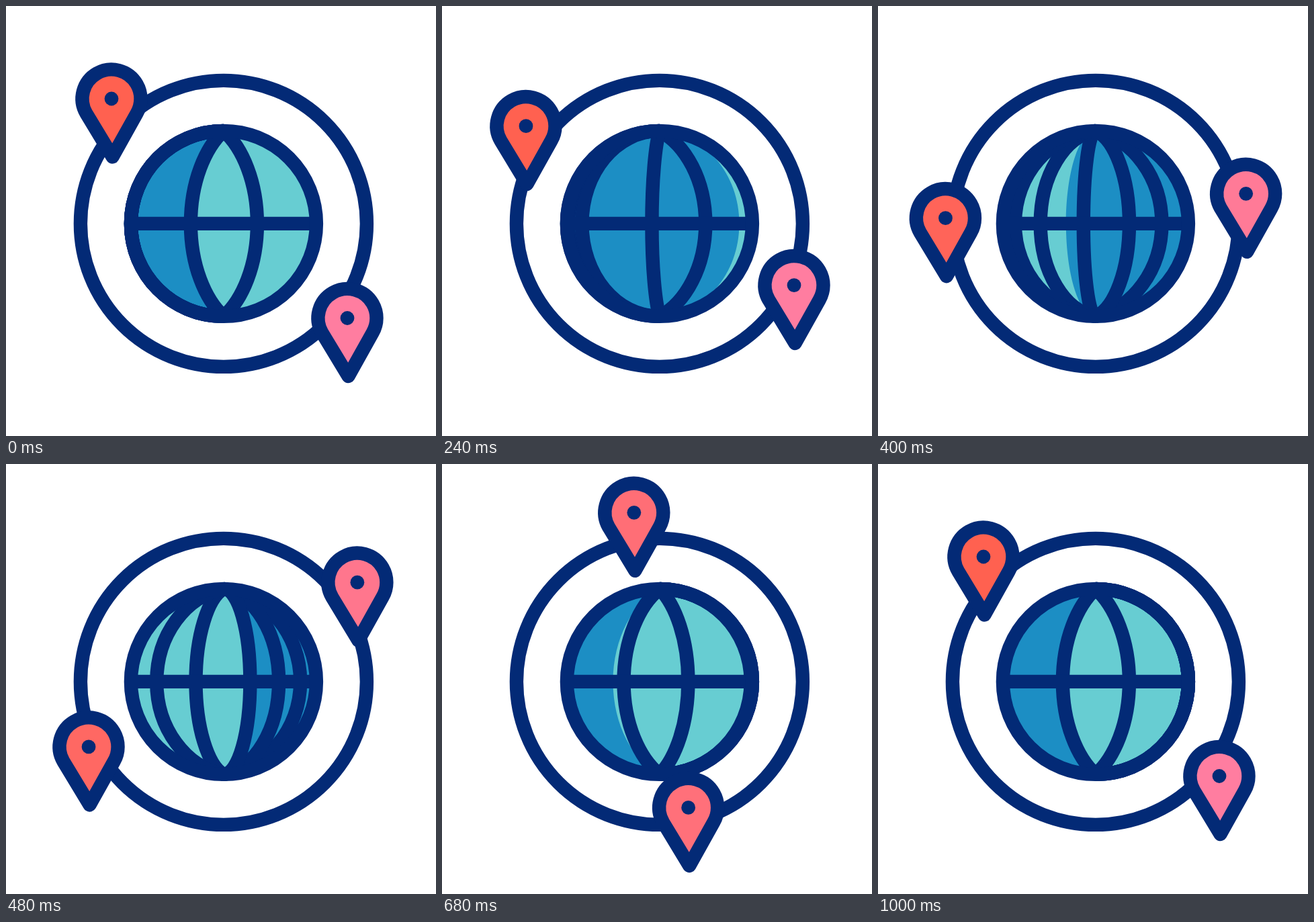
An HTML page with a canvas that plays this animation: 640x640 px, repeating every 2 s.

```html
<!DOCTYPE html>
<html lang="en">
<head>
<meta charset="utf-8">
<title>Globe with orbiting pins</title>
<style>
html, body { margin: 0; width: 100%; height: 100%; overflow: hidden; background: #fff; }
canvas { display: block; width: 640px; height: 640px; }
</style>
</head>
<body>
<canvas id="stage" width="640" height="640"></canvas>
<script>
const ctx = document.getElementById('stage').getContext('2d');
const LOOP = 2000, MOVE = 1000, STEP = 40;
const NAVY = '#032a76', LIGHT = '#67cdd2', DARK = '#1c8ec4';
const RED = [255, 97, 80], PINK = [255, 125, 160];
const CENTER = 323.9, ORBIT = 213, GLOBE = 138, PIN = 43.5;
const LEFT_REST = -49, RIGHT_REST = 50, PAST_EDGE = 145;
const REST_KINK = 25; // how far a resting meridian leans away from an ellipse
const RAD = Math.PI / 180;

const lerp = (a, b, s) => a + (b - a) * s;
const progress = (t, start, end) => Math.min(1, Math.max(0, (t - start) / (end - start)));
const smooth = s => s * s * (3 - 2 * s);

// Steep in-out easing for the trip along the orbit.
function orbitEase(s) {
  const done = s ** 2.06, left = 1.21 * (1 - s) ** 2.06;
  return done / (done + left);
}

// A curve that sweeps across the globe; only resting curves have a kink.
function sweep(from, to, start, end, color) {
  const kinkAt = x => Math.abs(x) < GLOBE ? REST_KINK : 0;
  return {
    color,
    at(t) {
      const s = smooth(progress(t, start, end));
      return {
        x: Math.min(GLOBE, lerp(from, to, s)),
        kink: lerp(kinkAt(from), kinkAt(to), s)
      };
    }
  };
}

const meridians = [
  sweep(RIGHT_REST, PAST_EDGE, 40, 750),
  sweep(LEFT_REST, PAST_EDGE, 40, 750),
  sweep(-GLOBE, GLOBE, 140, 710),
  sweep(-GLOBE, RIGHT_REST, 205, 745),
  sweep(-GLOBE, LEFT_REST, 260, 745)
];

// Each band fills the globe from its left side up to the sweeping curve.
const bands = [
  sweep(LEFT_REST, GLOBE, 0, 300, DARK),
  sweep(-GLOBE, GLOBE, 255, 625, LIGHT),
  sweep(-GLOBE, LEFT_REST, 480, 770, DARK)
];

function makePin(route, start, end) {
  const path = document.createElementNS('http://www.w3.org/2000/svg', 'path');
  path.setAttribute('d', route);
  return { path, length: path.getTotalLength(), start, end };
}

const pins = [
  makePin('M157 138C127 159 100 220 100 294S168 519 324 519C365 516 452 488 508 464.5'
    .replace('S168 519', 'C100 450 168 519'), RED, PINK),
  makePin('M508 464.5C518 440 548 340 548 294C548 153 465 69 324 69C250 69 182 108 157 138',
    PINK, RED)
];

function circle(x, y, r) {
  ctx.beginPath();
  ctx.arc(x, y, r, 0, 2 * Math.PI);
}

// Adds a pole-to-pole curve, from the bottom up.
function addMeridian({ x, kink }) {
  const poleX = 0.56 * x, poleY = GLOBE - kink, sideY = 76 - 0.56 * kink;
  ctx.bezierCurveTo(poleX, poleY, x, sideY, x, 0);
  ctx.bezierCurveTo(x, -sideY, poleX, -poleY, 0, -GLOBE);
}

function drawGlobe(t) {
  ctx.save();
  ctx.translate(CENTER, CENTER);
  circle(0, 0, GLOBE);
  ctx.fillStyle = LIGHT;
  ctx.fill();
  for (const band of bands) {
    ctx.beginPath();
    ctx.arc(0, 0, GLOBE, -Math.PI / 2, Math.PI / 2, true);
    addMeridian(band.at(t));
    ctx.fillStyle = band.color;
    ctx.fill();
  }
  for (const meridian of meridians) {
    ctx.beginPath();
    ctx.moveTo(0, GLOBE);
    addMeridian(meridian.at(t));
    ctx.stroke();
  }
  ctx.beginPath();
  ctx.moveTo(-GLOBE, 0);
  ctx.lineTo(GLOBE, 0);
  ctx.stroke();
  circle(0, 0, GLOBE);
  ctx.stroke();
  ctx.restore();
}

function drawPin({ path, length, start, end }, t) {
  const { x, y } = path.getPointAtLength(length * orbitEase(progress(t, 0, MOVE)));
  const mix = progress(t, 320, MOVE);
  const rgb = start.map((c, i) => Math.round(lerp(c, end[i], mix)));
  ctx.save();
  ctx.translate(x, y);
  ctx.beginPath();
  ctx.arc(0, 0, PIN, 150 * RAD, 30 * RAD);
  ctx.lineTo(1.5, 86.5);
  ctx.closePath();
  ctx.fillStyle = `rgb(${rgb})`;
  ctx.fill();
  ctx.stroke();
  circle(0, 0, 10.4);
  ctx.fillStyle = NAVY;
  ctx.fill();
  ctx.restore();
}

function draw(now) {
  const t = Math.floor(now % LOOP / STEP) * STEP;
  ctx.fillStyle = '#fff';
  ctx.fillRect(0, 0, 640, 640);
  ctx.strokeStyle = NAVY;
  ctx.lineWidth = 20.4;
  ctx.lineJoin = 'round';
  circle(CENTER, CENTER, ORBIT);
  ctx.stroke();
  drawGlobe(t);
  pins.forEach(pin => drawPin(pin, t));
}

const begin = performance.now();
function tick() {
  draw(performance.now() - begin);
  requestAnimationFrame(tick);
}
tick();
</script>
</body>
</html>
```
